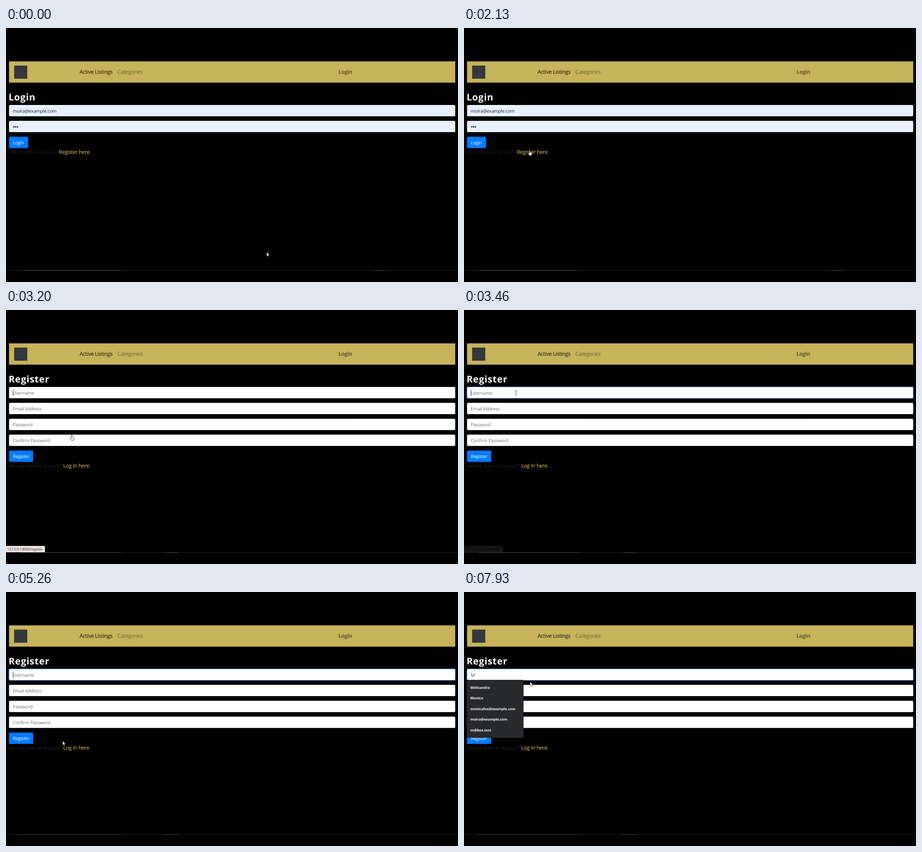
Recreate the animation shown at these times as an HTML page. Size 998x561 px, loop 8 s.

```html
<!DOCTYPE html>
<html lang="en">
<head>
<meta charset="utf-8">
<title>Auction sign-up</title>
<style>
  html, body { margin: 0; width: 100%; height: 100%; overflow: hidden; background: #000; }
  svg { display: block; width: 100%; height: 100%; }
  text {
    font: 10.3px "Open Sans", "Noto Sans", sans-serif;
    letter-spacing: -.03em;
    text-rendering: geometricPrecision;
    white-space: pre;
  }
  .nav { font-size: 11.95px; }
  .bold { font-weight: 700; }
  .title { font-size: 20.5px; font-weight: 700; letter-spacing: .8px; }
  .button { font-size: 10.4px; }
  .note { font-size: 10.5px; }
  .link { font-size: 11.75px; }
  .status { font-size: 7.8px; }
  .option { font-size: 7.9px; font-weight: 700; letter-spacing: -.01em; }
</style>
</head>
<body>
<svg id="stage" viewBox="0 0 998 561" xmlns="http://www.w3.org/2000/svg"></svg>
<script>
const LOOP = 8000;
const PAGE_TURN = 3200;
const KEY_PRESS = 7400;
const BLINK = 525;
const LEFT = 6.7;
const WIDTH = 985.2;
const ROW_HEIGHT = 25;
const stage = document.getElementById("stage");

function add(parent, tag, attrs, content) {
  const el = document.createElementNS(stage.namespaceURI, tag);
  for (const key in attrs) el.setAttribute(key, attrs[key]);
  if (content) el.textContent = content;
  parent.appendChild(el);
  return el;
}
const group = (parent = stage) => add(parent, "g", {});
const rect = (parent, x, y, width, height, fill, rx = 0) =>
  add(parent, "rect", { x, y, width, height, fill, rx });
const label = (parent, x, y, content, fill, cls = "") =>
  add(parent, "text", { x, y, fill, class: cls }, content);
const show = (el, on) => el.setAttribute("visibility", on ? "visible" : "hidden");
const clamp = v => Math.max(0, Math.min(1, v));
const smooth = v => v * v * (3 - 2 * v);
const rowY = i => 169.9 + 35.15 * i;

// Page frame
rect(stage, 0, 0, 998, 561, "#000001");
rect(stage, LEFT, 73.7, WIDTH, 47, "#c6b35a");
rect(stage, 18, 83, 29, 29, "#35383a");
label(stage, 162.6, 101.4, "Active Listings", "#14120a", "nav");
label(stage, 246, 101.4, "Categories", "#71683a", "nav");
label(stage, 734, 101.4, "Login", "#635a31", "nav bold");
rect(stage, 0, 535, 998, 1, "#262626");
rect(stage, 31, 535, 224, 1, "#4c4c4c");
const taskMark = rect(stage, 810, 535, 29, 1, "#555");

// Forms
const field = (parent, i, fill) => rect(parent, LEFT, rowY(i), WIDTH, ROW_HEIGHT, fill, 2.6);

function form(title, rows, buttonWidth, note, linkX, link) {
  const el = group();
  const y = rowY(rows);
  label(el, 5.7, 159.6, title, "#fff", "title");
  rect(el, LEFT, y, buttonWidth, ROW_HEIGHT, "#007bff", 2.6);
  label(el, 14.8, y + 16.6, title, "#fff", "button");
  label(el, LEFT, y + 37.7, note, "#1d2024", "note");
  label(el, linkX, y + 37.7, link, "#e8c74f", "link");
  return { el, rows, buttonWidth, linkX };
}

const login = form("Login", 2, 42, "Don't have an account?", 116.6, "Register here.");
field(login.el, 0, "#e8f0fe");
field(login.el, 1, "#e8f0fe");
label(login.el, 14.8, 187, "moira@example.com", "#212529");
for (let i = 0; i < 3; i++)
  add(login.el, "circle", { cx: 17.2 + 4 * i, cy: 218.2, r: 1.5, fill: "#111" });

const register = form("Register", 4, 53.3, "Already have an account?", 126.2, "Log In here.");
const ring = rect(register.el, LEFT - 2, rowY(0) - 2, WIDTH + 4, ROW_HEIGHT + 4, "#001f40", 4);
const hints = ["Username", "Email Address", "Password", "Confirm Password"].map((name, i) => {
  field(register.el, i, "#fff");
  return label(register.el, 14.8, rowY(i) + 17.1, name, "#6c757d");
});
const focusEdge = add(register.el, "rect", {
  x: LEFT + .3, y: rowY(0) + .3, width: WIDTH - .6, height: ROW_HEIGHT - .6, rx: 2.4,
  fill: "none", stroke: "#80bdff", "stroke-width": .6
});
const typed = label(register.el, 14.8, 187, "M", "#495057");
const caret = rect(register.el, 15, 175.5, .9, 14.5, "#333");

const menu = group(register.el);
rect(menu, 6.3, 194, 125.2, 128, "#28292b", 2);
["Melisandra", "Monica", "monicafox@example.com", "moira@example.com", "m@box.test"]
  .forEach((name, i) => label(menu, 14, 214 + 23.4 * i, name, "#f4f4f4", "option"));

// Link address bubble
const status = group();
add(status, "path", { d: "M0 521H84Q86 521 86 523V535H0Z", fill: "#eee0e0" });
label(status, 3, 530.6, "127.0.0.1:8000/register", "#3c3838", "status");

// Pointers, each drawn around its hotspot
const pointers = { arrow: group(), hand: group(), beam: group() };
add(pointers.arrow, "path", {
  d: "M0 0V9.2L2.1 7.3L3.5 10.4L5 9.8L3.7 6.8H6.4Z",
  fill: "#fff", stroke: "#000", "stroke-width": .6
});
add(pointers.hand, "path", {
  d: "M-1 .6Q0-.6 1 .6V4L4.6 5Q5.4 5.4 5.2 6.5L4.4 10V11.8H-1.2V10.2L-3.6 6.6Q-3.4 5.2-2.2 5.9L-1 7Z",
  fill: "#fff", stroke: "#222", "stroke-width": .8
});
add(pointers.beam, "path", {
  d: "M-2-4.5H-.6L0-4L.6-4.5H2M0-4V4M-2 4.5H-.6L0 4L.6 4.5H2",
  fill: "none", stroke: "#333", "stroke-width": .9
});

// The pointer rests at each stop until the next move begins
const origin = { x: 575.5, y: 495 };
const moves = [
  { from: 530, to: 830, x: 185, y: 346 },
  { from: 1100, to: 1900, x: 36, y: 136 },
  { from: 1960, to: 2130, x: 145, y: 270 },
  { from: 2200, to: 2330, x: 145, y: 276 },
  { from: 3220, to: 3600, x: 102, y: 142 },
  { from: 3600, to: 4200, x: 60, y: 287 },
  { from: 4230, to: 4960, x: 125, y: 329 },
  { from: 5270, to: 5600, x: 172, y: 354 },
  { from: 5600, to: 6250, x: 128, y: 216 },
  { from: 6290, to: 6460, x: 146, y: 198 }
];

function pointerAt(t) {
  let { x, y } = origin;
  for (const move of moves) {
    const k = smooth(clamp((t - move.from) / (move.to - move.from)));
    x += (move.x - x) * k;
    y += (move.y - y) * k;
  }
  return { x, y };
}

function pointerKind({ x, y }, page) {
  const over = (left, right, top, height) =>
    x >= left && x <= right && y >= top && y <= top + height;
  const end = rowY(page.rows);
  if (over(LEFT, LEFT + page.buttonWidth, end, ROW_HEIGHT)) return "hand";
  if (over(page.linkX, 187, end + 26, 15)) return "hand";
  for (let i = 0; i < page.rows; i++)
    if (over(LEFT, LEFT + WIDTH, rowY(i), ROW_HEIGHT)) return "beam";
  return "arrow";
}

function draw(t) {
  const signUp = t >= PAGE_TURN;
  const hasText = t >= KEY_PRESS;

  login.el.style.display = signUp ? "none" : "";
  register.el.style.display = signUp ? "" : "none";
  taskMark.setAttribute("x", t < 2560 ? 810 : 350);

  const focus = clamp((t - PAGE_TURN) / 150);
  ring.setAttribute("opacity", focus);
  focusEdge.setAttribute("opacity", focus);
  show(hints[0], !hasText);
  show(typed, hasText);
  show(menu, t >= KEY_PRESS + 30);

  const blinkStart = hasText ? KEY_PRESS : PAGE_TURN - 40;
  show(caret, Math.floor((t - blinkStart) / BLINK) % 2 === 0);
  caret.setAttribute("x", hasText ? 24.2 : 15);

  status.setAttribute("opacity", clamp((t - 2530) / 200) * clamp((3480 - t) / 200));

  // The pointer keeps its shape until it moves on the new page
  const spot = pointerAt(t);
  const kind = pointerKind(spot, t < PAGE_TURN + 40 ? login : register);
  for (const name in pointers) show(pointers[name], name === kind);
  pointers[kind].setAttribute("transform", `translate(${spot.x} ${spot.y})`);
}

const start = performance.now();
function tick() {
  draw((performance.now() - start) % LOOP);
  requestAnimationFrame(tick);
}
tick();
</script>
</body>
</html>
```
